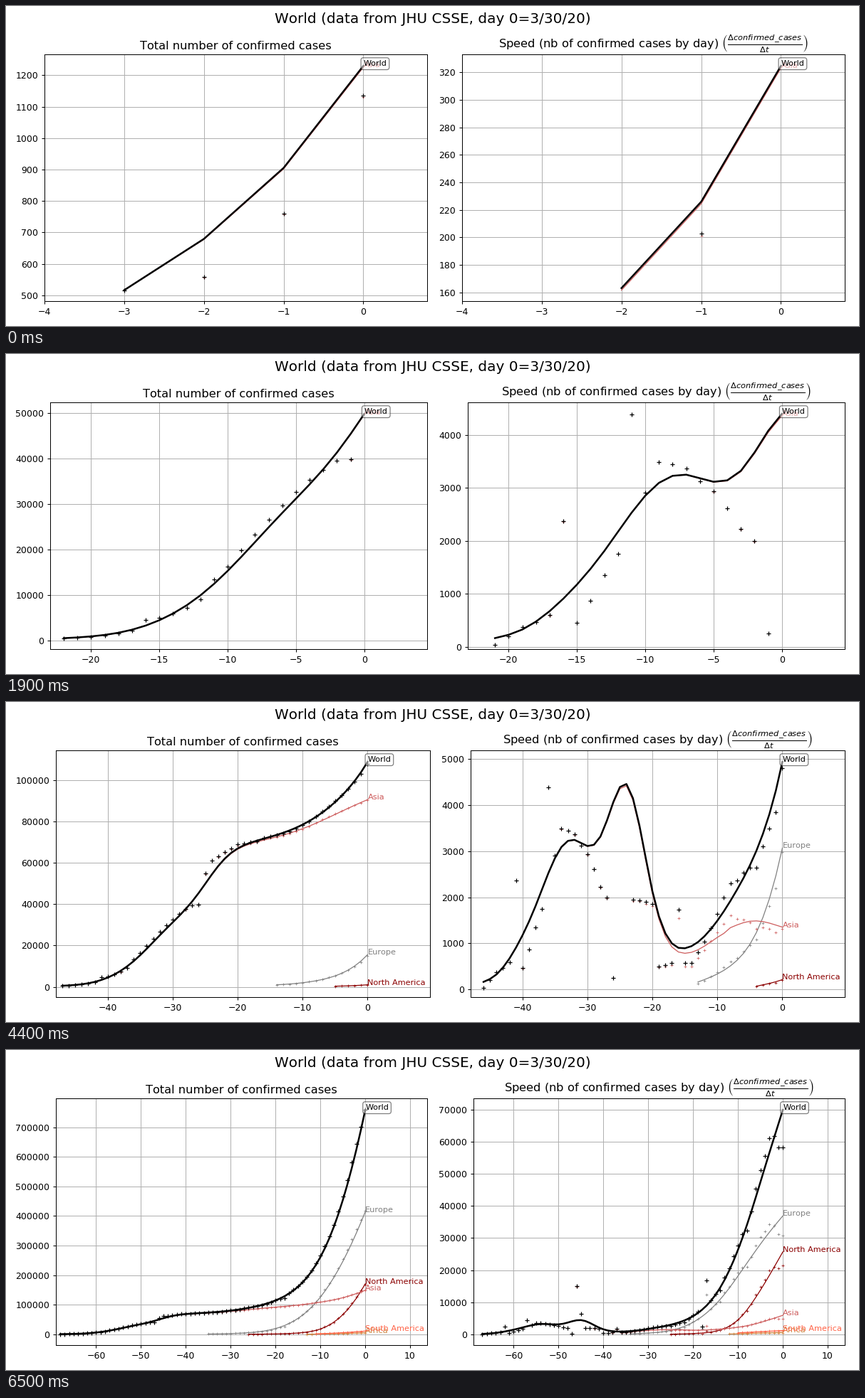
A matplotlib script for the animation above (9500 ms loop, 1197 by 450 pixels).

```python
import numpy as np
import matplotlib.pyplot as plt
from matplotlib.animation import FuncAnimation

W, H, DPI = 1197, 450, 90
LAST = 68            # newest day in the data
FIRST_SPAN = 3       # days shown before "day 0" at the start
STEPS, FRAMES = 66, 95
DIGIT = 7.95         # width of a tick digit in pixels


def spline(points, t):
    """Natural cubic spline through (x, y) points, evaluated at t."""
    x, y = np.array(points, float).T
    n, h = len(x), np.diff(x)
    a, b = np.eye(n), np.zeros(n)
    for i in range(1, n - 1):
        a[i, i - 1:i + 2] = h[i - 1], 2 * (h[i - 1] + h[i]), h[i]
        b[i] = 6 * ((y[i + 1] - y[i]) / h[i] - (y[i] - y[i - 1]) / h[i - 1])
    m = np.linalg.solve(a, b)
    i = np.clip(np.searchsorted(x, t) - 1, 0, n - 2)
    u, v, g = t - x[i], x[i + 1] - t, h[i]
    return ((m[i] * v**3 + m[i + 1] * u**3) / (6 * g)
            + (y[i] / g - m[i] * g / 6) * v
            + (y[i + 1] / g - m[i + 1] * g / 6) * u)


def days_after(start):
    return np.arange(start + 1, LAST + 1)


def total(base, speed):
    return base + np.r_[0, np.cumsum(speed)]


# Smoothed new cases per day.
days = days_after(0)
world = spline([(1, 163.2), (2, 226), (3, 324.7), (6, 907), (9, 1806),
                (13, 3093), (15, 3247), (17, 3113), (19, 3320), (21, 4075),
                (23, 4460), (25, 3560), (27, 2130), (29, 1215), (32, 893),
                (36, 1310), (40, 2160), (44, 3375), (49, 6600), (54, 14480),
                (60, 34100), (64, 52000), (68, 69900)], days)
outside = (1.5 + 40 / (1 + np.exp((20 - days) / 1.5))
           + 600 * np.exp((days - 39) / 3.2))
late = spline([(39, 1340), (42, 1480), (45, 1440), (49, 1310), (54, 1660),
               (60, 2700), (68, 5950)], np.maximum(days, 39))
asia = np.where(days < 39, world - outside, late)
europe = spline([(34, 160), (39, 510), (44, 1560), (49, 4620), (54, 10850),
                 (60, 22200), (65, 31800), (68, 36900)], days_after(33))
north = spline([(43, 70), (49, 335), (54, 1350), (58, 4500), (62, 11600),
                (68, 25700)], days_after(42))
south = np.linspace(500, 1200, LAST - 57)
africa = np.linspace(130, 600, LAST - 55)

# Reported cases: a jittered trend with a few late or bulk reports.
trend = [(1, 40), (3, 365), (5, 590), (7, 450), (10, 1750), (13, 3500),
         (16, 3150), (18, 2550), (21, 1700), (23, 2030), (27, 1850),
         (28, 480), (30, 585), (33, 560), (36, 1300), (39, 2300),
         (43, 2700), (46, 3920), (49, 6840), (54, 13680), (58, 28000),
         (60, 32500), (65, 61700), (68, 58500)]
jumps = {6: 1850, 11: 2000, 21: -1470, 22: 13100, 23: 4350, 31: 1150,
         50: -5800, 51: 7000}
rng = np.random.default_rng(4)
reported = np.interp(days, *zip(*trend)) * rng.uniform(0.97, 1.03, LAST)
for day, extra in jumps.items():
    reported[day - 1] += extra
pace = reported / world

# name, colour, first day, first total, smoothed speed
REGIONS = [
    ("Africa", "peru", 55, 300, africa),
    ("South America", "tomato", 57, 1400, south),
    ("North America", "darkred", 42, 300, north),
    ("Europe", "gray", 33, 980, europe),
    ("Asia", "indianred", 0, 516, asia),
    ("World", "black", 0, 516, world),
]

plt.rcParams.update({"font.family": "DejaVu Sans", "font.size": 10,
                     "text.kerning_factor": 6})
fig = plt.figure(figsize=(W / DPI, H / DPI), dpi=DPI)
fig.suptitle("World (data from JHU CSSE, day 0=3/30/20)", fontsize=16)
axes = [fig.add_subplot(1, 2, i) for i in (1, 2)]
axes[0].set_title("Total number of confirmed cases", fontsize=13)
axes[1].set_title(
    "Speed (nb of confirmed cases by day) "
    r"$\left(\frac{\Delta confirmed\_cases}{\Delta t}\right)$", fontsize=13)


class Curve:
    """Smoothed line, daily crosses and end label of one region."""

    def __init__(self, ax, name, color, start, line, raw):
        main = name == "World"
        z = 4 if main else 3
        self.start, self.line, self.raw = start, line, raw
        self.path, = ax.plot([], [], color=color, lw=2 if main else 1,
                             zorder=z)
        self.marks, = ax.plot([], [], "+", color=color, zorder=z,
                              ms=5 if main else 3, mew=1 if main else 0.6)
        box = dict(boxstyle="round,pad=0.3", fc="white", ec="black",
                   alpha=0.5) if main else None
        self.label = ax.text(0, 0, name, color=color, fontsize=9, bbox=box,
                             zorder=z + 2)

    def update(self, now):
        n = max(0, now - self.start + 1)
        x = np.arange(self.start, self.start + n) - now
        shown = self.line[:n]
        self.path.set_data(x, shown)
        self.marks.set_data(x, self.raw[:n])
        self.label.set_visible(n > 0)
        if n:
            self.label.set_y(shown[-1])
        return shown


curves = [[], []]
for name, color, start, base, speed in REGIONS:
    raw = speed * pace[start:]
    curves[0].append(Curve(axes[0], name, color, start,
                           total(base, speed), total(base, raw)))
    curves[1].append(Curve(axes[1], name, color, start + 1, speed, raw))
for ax in axes:
    ax.grid(True)


def label_width(ax):
    lo, hi = ax.get_ylim()
    top = max(t for t in ax.get_yticks() if lo <= t <= hi)
    return DIGIT * len(f"{top:.0f}")


def arrange(span):
    """Fit both plots around their tick labels."""
    hi = 0.2 * span
    tick = max(t for t in axes[0].get_xticks() if t <= hi + 1e-9)
    over = DIGIT * len(f"{tick:.0f}") / 2 - (hi - tick) / (1.2 * span) * 529
    left = 22.1 + label_width(axes[0])
    gap = 22.25 + label_width(axes[1]) + max(2.8, over)
    right = W - 13.5 - max(6.5, over)
    width = (right - left - gap) / 2
    for ax, x in zip(axes, (left, right - width)):
        ax.set_position([x / W, 34.6 / H, width / W, 347 / H])


def draw(frame):
    now = min(frame, STEPS - 1) + FIRST_SPAN
    span = now + 1
    for ax, group in zip(axes, curves):
        values = np.concatenate([c.update(now) for c in group])
        lo, hi = values.min(), values.max()
        pad = 0.05 * (hi - lo)
        ax.set_xlim(-span, 0.2 * span)
        ax.set_ylim(lo - pad, hi + pad)
    arrange(span)
    return []


draw(0)
anim = FuncAnimation(fig, draw, frames=FRAMES, interval=100, repeat=True,
                     repeat_delay=0, blit=False)
plt.show()
```
